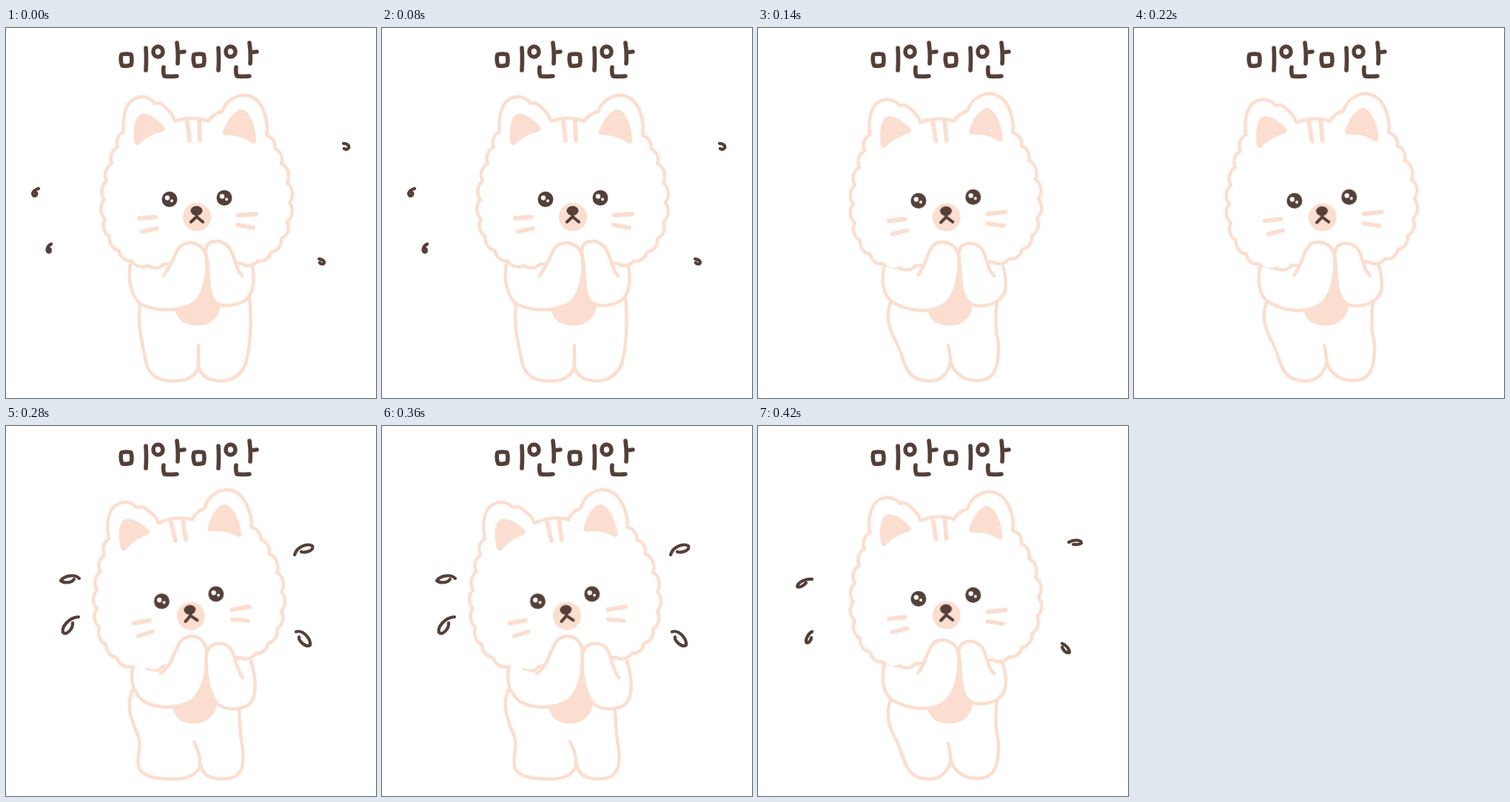
Animation, 500 px wide and 500 px high, one loop 0.56 s. Source, as an HTML page:

```html
<!DOCTYPE html>
<html lang="ko">
<head>
<meta charset="utf-8">
<title>미안미안</title>
<style>
  html, body { margin: 0; width: 100%; height: 100%; overflow: hidden; background: #fff; }
  svg { display: block; width: 100vw; height: 100vh; }
  path { stroke-linecap: round; stroke-linejoin: round; }
  .line { fill: none; stroke: #fbdecf; stroke-width: 4.5; }
  .skin { fill: #fff; stroke: #fbdecf; stroke-width: 4.5; }
  .blush { fill: #fbdecf; }
  .mark { fill: none; stroke: #fbdecf; stroke-width: 5.8; }
  .ink { fill: none; stroke: #553f39; stroke-width: 4.2; }
  .title { stroke-width: 5.6; }
  .dark { fill: #553f39; }
  .shine { fill: #fff; }
</style>
</head>
<body>
<svg viewBox="0 0 500 500" xmlns="http://www.w3.org/2000/svg">
  <g id="bodies"></g>
  <g id="head">
    <path id="fur" class="skin"/>
    <path class="blush" d="M174 156C171 142 173 123 181 117C190 112 206 124 214 134C217 138 212 140 205 142C193 146 186 151 180 157Q176 160 174 156Z"/>
    <path class="blush" d="M293 141C297 127 309 110 319 110C330 112 338 134 338 153C337 157 334 157 330 154C320 147 310 145 298 145Q293 145 293 141Z"/>
    <path class="mark" d="M245 127L248 152M261 126L262 152"/>
    <path class="mark" d="M180 257L202 255.500M184 275L204 271M314 253L338 251.500M313 266L334 270"/>
    <circle class="blush" cx="258" cy="255.500" r="19"/>
    <ellipse class="dark" cx="257.500" cy="247" rx="8" ry="6.500"/>
    <path class="ink" d="M257.500 250V255L250 262M257.500 255L266 262"/>
    <g id="eyes"></g>
  </g>
  <g id="arms"></g>
  <g id="sweat"></g>
  <g role="img" aria-label="미안미안">
    <path id="word" class="ink title" d="M156 36Q163 34 169 36Q171 43 169 50Q163 52 157 51Q154 44 156 36ZM189 27Q190 42 189 57M212 32A6.500 7 0 1 1 199 32A6.500 7 0 1 1 212 32ZM231 20Q233 34 232 48M233 33L241 32M213 53Q212 60 214 65Q222 66 231 65"/>
    <use href="#word" x="98"/>
  </g>
</svg>
<script>
const LOOP = 560;
const poses = [
  {
    turn: 0,
    body: 'M181 374C177 402 185 428 188 446C191 469 205 477 225 477C247 478 260 468 260 453V429M329 364C332 395 331 421 326 445C322 468 306 477 290 477C271 477 260 467 260 453',
    belly: 'M272 328L238 374L228 378C230 395 243 402 259 402C276 402 288 392 290 375Z',
    left: 'M168 320C164 342 170 366 184 374C205 384 235 382 252 373C268 362 273 335 271 312C269 294 255 288 243 291C231 294 228 310 221 322Q217 329 213 335',
    right: 'M319 335C311 327 310 314 305 303C299 289 284 284 273 292C267 299 272 308 273 324C274 342 274 357 280 367C286 377 302 377 318 371C334 364 337 345 333 321'
  },
  {
    turn: -2.35,
    body: 'M179 371C171 393 179 410 187 425C195 439 197 462 210 471C219 478 238 479 247 473C256 466 261 456 260 446Q259 437 257 429M323 370C320 392 321 410 325 427C325 447 324 460 316 469C308 478 290 478 279 473C267 467 261 458 260 446',
    belly: 'M272 328L238 374L229 380C231 395 243 402 260 402C277 402 288 391 290 375Z',
    left: 'M171 322C166 342 169 361 181 370C202 383 236 387 254 372C270 357 273 326 271 308C269 293 254 287 243 290C231 294 229 312 222 325Q219 330 216 334',
    right: 'M319 335C311 327 310 316 306 305C301 292 286 287 275 295C269 302 272 310 273 324C274 344 275 358 282 368C289 378 306 377 320 371C338 363 337 343 331 321'
  },
  {
    turn: -6.1,
    body: 'M171 357C160 382 173 403 180 423C183 437 175 450 180 463C187 477 213 477 229 477C253 477 265 465 262 450Q260 437 254 427M314 374C316 386 315 404 318 425C322 446 322 462 314 470C306 479 280 479 270 471Q262 463 262 450',
    belly: 'M272 328L236 374L225 378C227 395 239 402 254 402C271 402 283 392 285 375Z',
    left: 'M172 325C167 343 172 361 186 372C205 383 232 382 250 372C268 359 272 330 271 305C270 289 256 281 245 285C232 289 229 306 222 320Q216 330 209 334',
    right: 'M320 340C312 330 311 317 306 305C300 292 284 291 275 299C268 307 271 316 271 330C272 346 276 362 284 373C293 385 312 384 326 378C341 368 338 340 331 318'
  }
];
const order = [0, 1, 2, 1];

const drops = [
  'M44 217C37 219 34 224 38 227C42 227 42 223 40 222M61 292C55 295 54 302 58 303C61 302 60 298 58 298M456 156C463 156 465 161 462 163Q460 165 457 163M423 312C430 313 432 318 428 319Q425 319 424 317',
  '',
  'M99 206C92 199 78 203 74 209C79 213 89 212 92 207M98 258C84 259 75 272 77 279C81 284 91 274 90 266M390 174C393 163 407 158 414 162C417 168 405 172 399 170M392 278C402 275 412 288 411 296C406 300 395 291 396 285',
  'M73 207C64 206 54 211 53 217C57 219 62 215 65 212M73 278C67 281 63 291 66 293C70 293 72 288 72 286M420 157C428 153 437 154 437 158C434 161 428 160 426 160M411 294C417 296 421 302 421 306C416 308 412 302 411 299'
];

const $ = id => document.getElementById(id);

function add(parent, tag, attrs) {
  const el = document.createElementNS('http://www.w3.org/2000/svg', tag);
  for (const key in attrs) el.setAttribute(key, attrs[key]);
  return parent.appendChild(el);
}

// Holds each value for an equal share of the loop.
function hold(el, prop, values) {
  const steps = values.concat(values[0]).map((v, i) => (
    { [prop]: v, offset: i / values.length, easing: 'steps(1, end)' }));
  el.animate(steps, { duration: LOOP, iterations: Infinity }).startTime = 0;
}

const bumps = points => points.map(([x, y], i) => {
  if (!i) return '';
  const [px, py] = points[i - 1];
  const r = Math.hypot(x - px, y - py) * 0.72;
  return `A${r} ${r} 0 0 1 ${x} ${y}`;
}).join('');

const rightSide = [[352, 145], [363, 163], [372, 183], [380, 209], [383, 236],
  [380, 262], [372, 285], [358, 303], [340, 315], [318, 318]];
const leftSide = [[213, 319], [192, 321], [170, 315], [153, 301], [140, 282],
  [134, 258], [133, 232], [136, 207], [143, 183], [151, 161], [159, 140]];

$('fur').setAttribute('d',
  'M159 140C157 122 161 100 175 95C187 90 197 96 201 102Q209 99 216 108Q225 115 228 126Q251 118 274 126' +
  'Q280 115 292 113Q297 99 309 94C325 86 340 94 347 109C352 120 354 133 352 145' +
  bumps(rightSide) + 'L213 319' + bumps(leftSide) + 'Z');

for (const [x, y] of [[221, 231.5], [295, 229.5]]) {
  add($('eyes'), 'circle', { class: 'dark', cx: x, cy: y, r: 10.5 });
  add($('eyes'), 'circle', { class: 'shine', cx: x - 3, cy: y - 2, r: 3.2 });
  add($('eyes'), 'circle', { class: 'shine', cx: x + 3, cy: y + 2, r: 2 });
}

const show = (el, test) =>
  hold(el, 'visibility', order.map((p, i) => test(p, i) ? 'visible' : 'hidden'));

poses.forEach((pose, n) => {
  const body = add($('bodies'), 'g', {});
  add(body, 'path', { class: 'line', d: pose.body });
  add(body, 'path', { class: 'blush', d: pose.belly });
  const arms = add($('arms'), 'g', {});
  add(arms, 'path', { class: 'skin', d: pose.left });
  add(arms, 'path', { class: 'skin', d: pose.right });
  show(body, p => p === n);
  show(arms, p => p === n);
});

drops.forEach((d, n) => {
  if (d) show(add($('sweat'), 'path', { class: 'ink', d }), (p, i) => i === n);
});

$('head').style.transformOrigin = '266px 333px';
hold($('head'), 'transform', order.map(p => `rotate(${poses[p].turn}deg)`));
</script>
</body>
</html>
```
